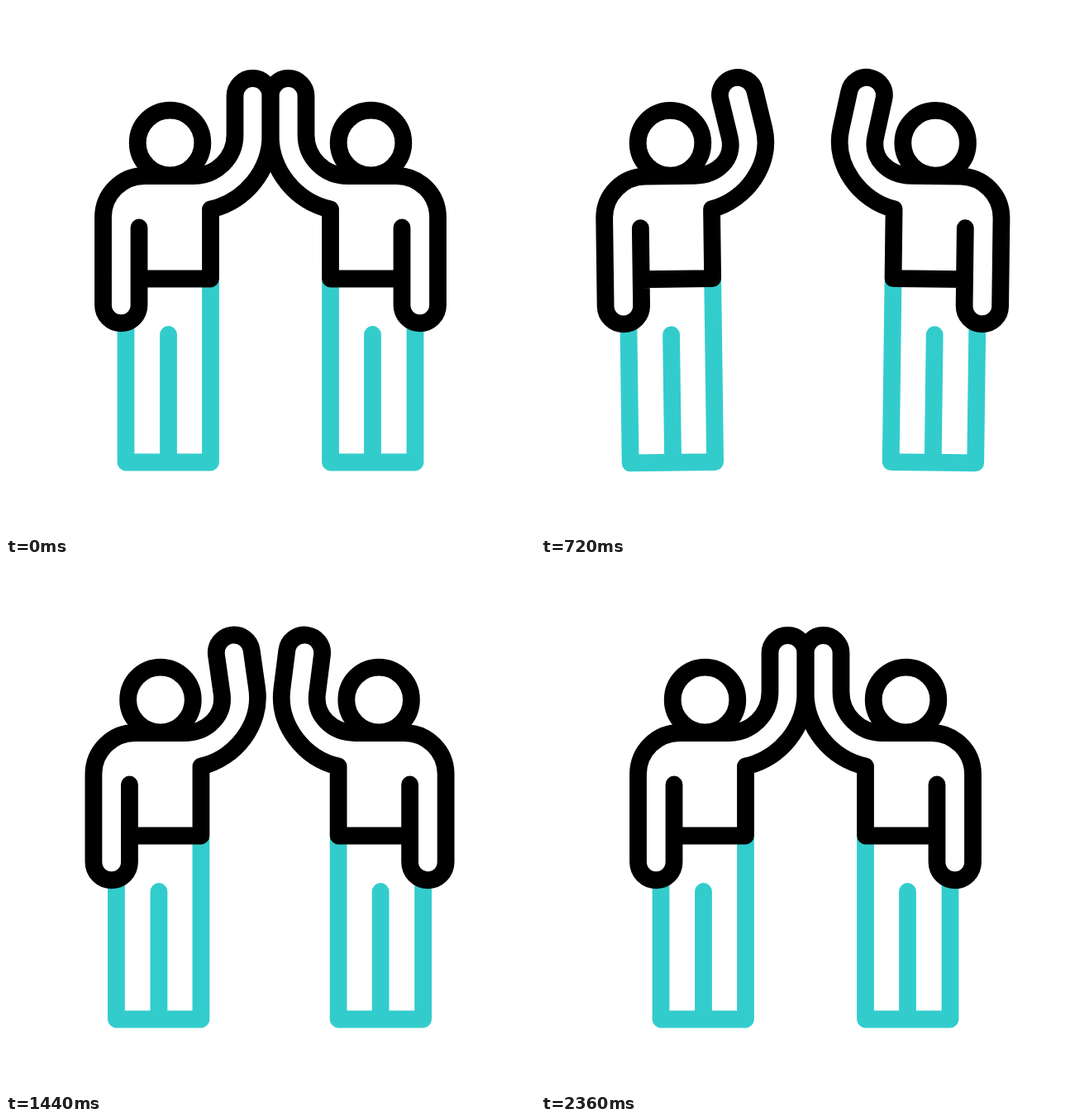
An HTML page for the animation above (2600 ms loop, 640x640 px).

```html
<!DOCTYPE html>
<html lang="en">
<head>
<meta charset="utf-8">
<title>High five</title>
<style>
  html, body { margin: 0; width: 100%; height: 100%; overflow: hidden; background: #fff; }
  svg { display: block; width: 100vw; height: 100vh; }
  path, circle { fill: none; stroke-width: 20.8; stroke-linecap: round; stroke-linejoin: round; }
  .ink { stroke: #000; }
  .teal { stroke: #3cc; }
</style>
</head>
<body>
<svg viewBox="0 0 640 640">
  <g id="left"></g>
  <g transform="translate(640) scale(-1 1)"><g id="right"></g></g>
  <path id="rays" class="teal"/>
</svg>
<script>
const LOOP = 2600, STEP = 40;
const $ = id => document.getElementById(id);
const mix = (a, b, k) => a + (b - a) * k;

// Progress from 0 to 1 between two times
const linear = (t, from, to) => Math.min(1, Math.max(0, (t - from) / (to - from)));
const ease = (t, from, to) => {
  const u = linear(t, from, to);
  return u * u * (3 - 2 * u);
};
const easeOut = (t, from, to) => 1 - (1 - linear(t, from, to)) ** 2;

// Points of the raised forearm are placed around its elbow, which gives way as it bends
function bodyPath(bend) {
  const angle = bend * 0.225, sin = Math.sin(angle), cos = Math.cos(angle);
  const elbowX = 298.5 - 7.3 * bend, elbowY = 156 - 1.5 * bend;
  const at = (side, down) => {
    const across = side * 21.5;
    return `${elbowX + across * cos + down * sin} ${elbowY - across * sin + down * cos} `;
  };
  return `M161 268V362A21.75 21.75 0 0 1 117.5 362V255A50 50 0 0 1 167.5 205.5H227
    C254.5 205.5 ${at(-1, 27.5)}${at(-1, 0)}L${at(-1, -47)}A21.5 21.5 0 0 1 ${at(1, -47)}
    L${at(1, 0)}C${at(1, 43.6)}289 236.6 247.5 246V330H161`;
}

function makePerson(id, { reach, lean, flex, stepStart, nodStart }) {
  const root = $(id);
  root.innerHTML = `
    <path class="teal" d="M145 386V552H247.5V334M196.5 397.5V552"/>
    <path class="ink"/>
    <circle class="ink" cx="198.5" cy="165.5" r="39.3"/>`;
  const body = root.querySelector('path.ink'), head = root.querySelector('circle');
  return t => {
    const shift = reach * (ease(t, stepStart, 800) - ease(t, 1160, 1600));
    const tilt = lean * (ease(t, 80, 345) - ease(t, 560, 800));
    const bend = flex * (ease(t, 80, 325) - ease(t, 1340, 1580));
    const nod = 6 * (ease(t, nodStart, nodStart + 120) - ease(t, 1760, 2370));
    root.setAttribute('transform', `translate(${-shift}) rotate(${-tilt} 216 552)`);
    body.setAttribute('d', bodyPath(bend));
    head.setAttribute('cy', 165.5 - nod);
  };
}

const people = [
  makePerson('left', { reach: 38.5, lean: 2.95, flex: 1, stepStart: 155, nodStart: 1600 }),
  makePerson('right', { reach: 32, lean: 2.8, flex: 0.9, stepStart: 135, nodStart: 1580 })
];

// Three rays fan out from the clap, 45 degrees apart
function drawRays(t) {
  const tip = easeOut(t, 1540, 1760), tail = ease(t, 1680, 2160);
  const ray = i => {
    const angle = i * Math.PI / 4;
    const at = k => {
      const r = mix(35, 106 - 10 * Math.abs(i), k);
      return `${319.5 + r * Math.sin(angle)} ${139 - r * Math.cos(angle)}`;
    };
    return `M${at(tail)}L${at(tip)}`;
  };
  $('rays').setAttribute('d', tip > 0 && tail < 1 ? [-1, 0, 1].map(ray).join('') : '');
}

function frame() {
  const t = Math.floor(performance.now() % LOOP / STEP) * STEP;
  people.forEach(pose => pose(t));
  drawRays(t);
  requestAnimationFrame(frame);
}
frame();
</script>
</body>
</html>
```
